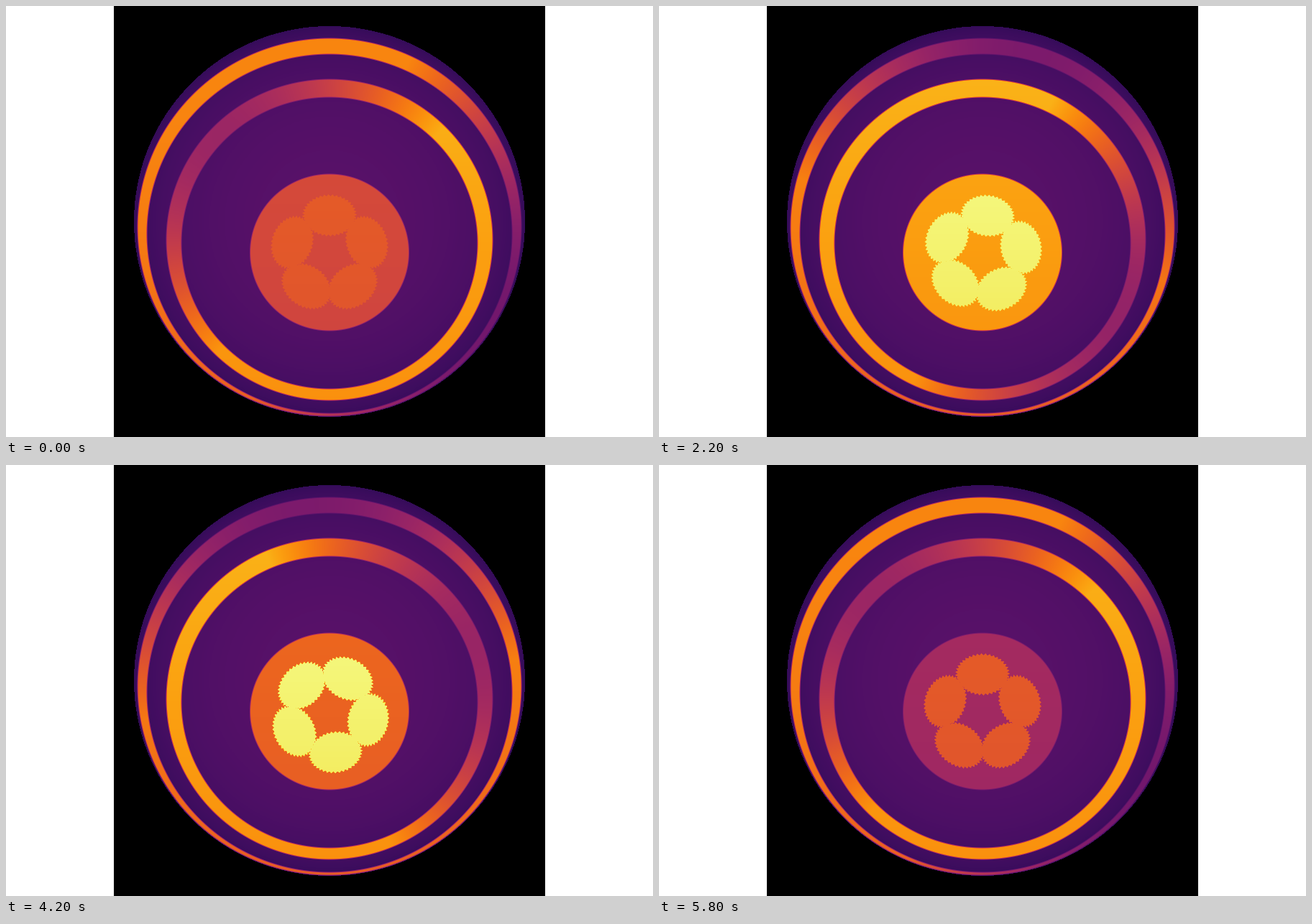
Write an HTML page with a canvas that moves like this. It is 900 px wide and 600 px high and loops after 6 s.

```html
<!DOCTYPE html>
<html lang="en">
<head>
<meta charset="utf-8">
<title>Rotating rings</title>
<style>
  html, body { margin: 0; width: 100%; height: 100%; overflow: hidden; background: #fff; }
  canvas { position: absolute; left: 150px; top: 0; width: 600px; height: 600px; background: #000; }
</style>
</head>
<body>
<canvas id="view" width="600" height="600"></canvas>
<script>
const SIZE = 600, STEP_MS = 200, STEPS = 30;
const TURN = 2 * Math.PI, DEG = Math.PI / 180;
const ctx = document.getElementById('view').getContext('2d');
const image = ctx.createImageData(SIZE, SIZE);
const pixels = new Uint32Array(image.data.buffer);

const clamp = (v, lo = 0, hi = 1) => Math.min(hi, Math.max(lo, v));
const mix = (a, b, k) => a + (b - a) * k;

// Heat colours: one polynomial per channel, lowest power first.
const CHANNELS = [
  [0.00022, 0.10651, 11.60249, -41.704, 77.16294, -71.31943, 25.13113],
  [0.00165, 0.56396, -3.97285, 17.4364, -33.40236, 32.62606, -12.24267],
  [-0.01948, 3.93271, -15.94239, 44.35415, -81.80731, 73.20952, -23.07033]
];
const palette = Uint32Array.from({ length: 1024 }, (_, i) => {
  const [r, g, b] = CHANNELS.map(c =>
    Math.round(255 * clamp(c.reduceRight((sum, k) => sum * i / 1023 + k, 0))));
  return (255 << 24 | b << 16 | g << 8 | r) >>> 0;
});

// Soft coverage of an ellipse centred on the vertical axis.
function cover(x, y, cy, rx, ry) {
  const dx = x / rx, dy = (y - cy) / ry;
  return clamp(0.5 + (1 - Math.sqrt(dx * dx + dy * dy)) * ry / 2);
}

// A plateau with a half-cosine dip centred on the given angle.
function dip(x, y, cy, angle, depth) {
  return 1 - depth * Math.max(0, Math.cos(Math.atan2(x, cy - y) - angle));
}

// Coverage of five rough-edged petals.
function petals(x, y, spin) {
  const dy = 346 - y, dist = Math.sqrt(x * x + dy * dy);
  if (dist < 20 || dist > 90) return 0;
  const sector = TURN / 5;
  let a = Math.atan2(x, dy) - spin;
  a -= sector * Math.round(a / sector);
  const u = dist * Math.sin(a) / 36.5;
  const w = (dist * Math.cos(a) - 54.5) / 28;
  const tooth = Math.asin(Math.sin(Math.atan2(w, u) * 40)) * 0.9;
  return clamp(0.5 + (1 - Math.sqrt(u * u + w * w)) * 31 + tooth);
}

function draw(step) {
  const turn = step / (STEPS - 1) * TURN;
  const outerDip = 115 * DEG - 6 * turn;
  const innerDip = -45 * DEG - 12 * turn;
  const coreHeat = 0.57 + 0.22 * Math.sin(step / 48 * TURN);
  const petalHeat = Math.min(0.955, 0.625 + 0.8 * Math.sin(turn / 2));

  for (let py = 0, i = 0; py < SIZE; py++) {
    const y = py + 0.5;
    for (let px = 0; px < SIZE; px++, i++) {
      const x = px + 0.5 - SIZE / 2;
      const rim = (x * x + (y - 300) ** 2) / (272 * 272);
      if (rim > 1) { pixels[i] = palette[0]; continue; }
      let heat = 0.165 + 0.09 * Math.sqrt(1 - rim);

      const outer = cover(x, y, 308, 267, 263) * (1 - cover(x, y, 317, 254, 250));
      if (outer > 0) {
        const shade = 0.74 * (1 - 0.14 * Math.pow(clamp((y - 45) / 527), 2.3));
        heat = mix(heat, shade * dip(x, y, 312, outerDip, 0.54), outer);
      }

      const inner = cover(x, y, 325.5, 227, 223.5) * (1 - cover(x, y, 330, 206, 203));
      if (inner > 0) {
        const shade = 0.83 - 0.067 * (y - 102) / 447;
        heat = mix(heat, shade * dip(x, y, 328, innerDip, 0.49), inner);
      }

      const core = cover(x, y, 343, 110.5, 109);
      if (core > 0) {
        const shade = 1 - 0.03 * (y - 343) / 218;
        heat = mix(heat, coreHeat * shade, core);
        heat = mix(heat, petalHeat * shade, petals(x, y, -turn));
      }
      pixels[i] = palette[Math.round(clamp(heat) * 1023)];
    }
  }
  ctx.putImageData(image, 0, 0);
}

let shown = -1;
function tick() {
  const step = Math.floor(performance.now() / STEP_MS) % STEPS;
  if (step !== shown) draw(shown = step);
  requestAnimationFrame(tick);
}
tick();
</script>
</body>
</html>
```
